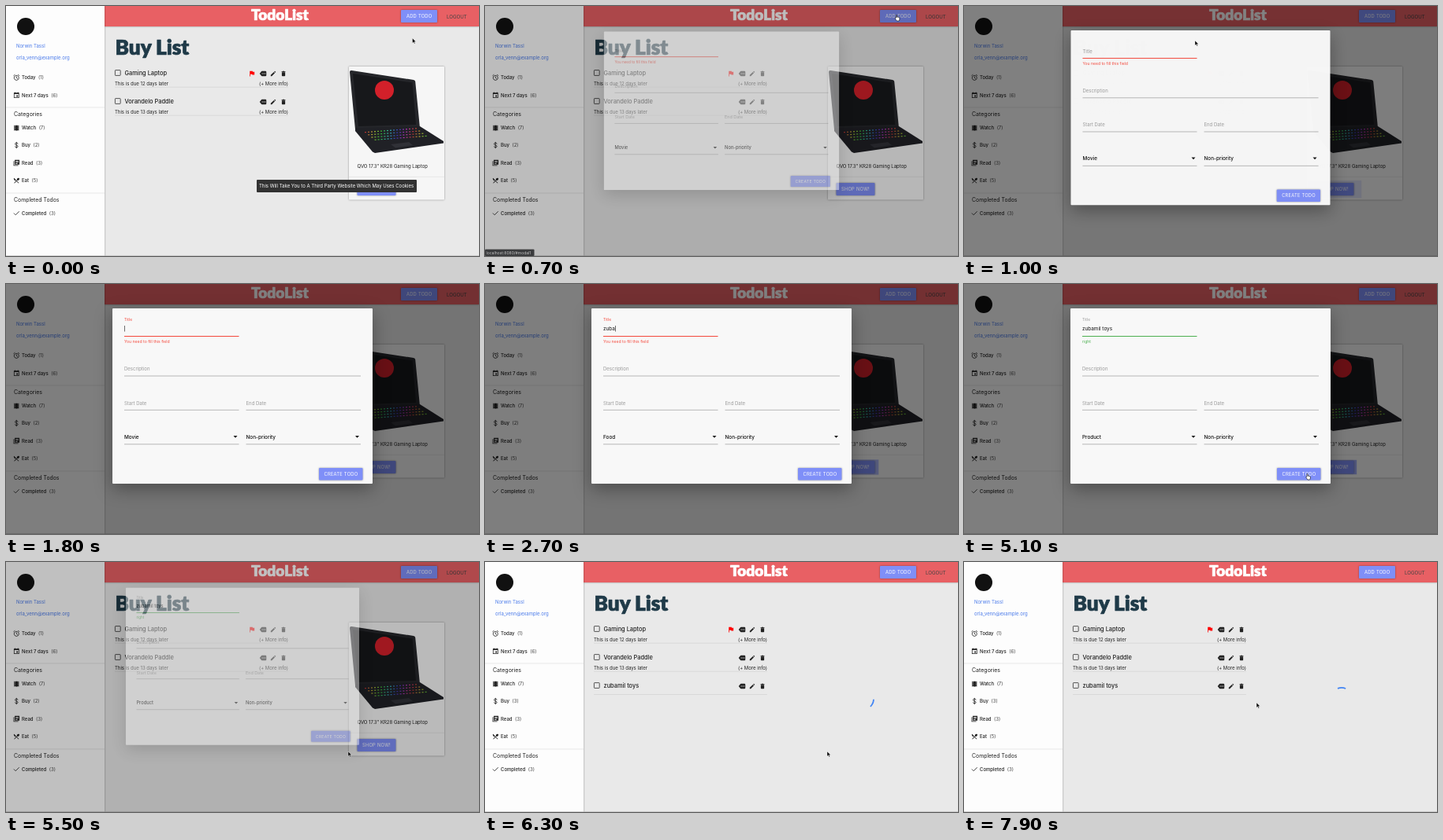
Write an HTML page that moves like this. It is 600 px wide and 318 px high and loops after 8 s.

```html
<!DOCTYPE html>
<html lang="en">
<head>
<meta charset="utf-8">
<title>TodoList</title>
<style>
html, body { margin: 0; width: 100%; height: 100%; overflow: hidden; background: #e9e9e9; }
svg { display: block; width: 100vw; height: 100vh; font: 6px Inter, sans-serif; fill: #222; }
.display { font-family: Lato, sans-serif; font-weight: 900; stroke-linejoin: round; stroke-width: .7; }
.medium { font-weight: 500; }
.button { font-size: 5.8px; letter-spacing: .22px; fill: #fff; }
.hint { fill: #9a9a9a; }
.input { font-size: 6.4px; fill: #111; }
.shadow { filter: drop-shadow(0 .8px 1px #0006); }
.deep-shadow { filter: drop-shadow(0 7px 11px #0005); }
</style>
</head>
<body>
<svg id="stage" viewBox="0 0 600 318" preserveAspectRatio="none"></svg>
<script>
const LOOP = 8000;
const OPEN = { start: 580, length: 560 };
const CLOSE = { start: 5410, length: 300 };
const FOCUS = 1250, TYPING = 2000, PER_KEY = 160, SUBMIT = 5000, REFRESH = 5700;
const NEW_ITEM = 'zubamil toys';
const RED = '#f4483c', GREEN = '#4caf50', BLUE = '#7f8ff8';

// Icons on a 24 unit grid; stroked ones are listed in LINE_ICONS.
const ICONS = {
  alarm: 'M12 5a8 8 0 1 0 .01 0zM12 8v5l4 3M2 6l5-4M17 2l5 4',
  event: 'M19 3h-1V1h-2v2H8V1H6v2H3v18h18V3zm0 16H5V8h14zm-2-7h-5v5h5z',
  film: 'M18 3v2h-2V3H8v2H6V3H4v18h2v-2h2v2h8v-2h2v2h2V3zM6 8h2v2H6zM6 13h2v2H6zM16 8h2v2h-2zM16 13h2v2h-2z',
  money: 'M17 8c0-5-10-5-10 0s10 3 10 8-10 5-10 0M12 1v22',
  book: 'M4 6H2v16h16v-2H4zM22 2H6v16h16zM19 11H9V9h10zM15 15H9v-2h6zM19 7H9V5h10z',
  food: 'M8.1 13.3l2.8-2.8-7-7c-1.5 1.6-1.5 4 0 5.7zM14.9 11.5c1.5.7 3.7.2 5.3-1.4 1.9-1.9 2.2-4.6.8-6.1-1.5-1.5-4.2-1.1-6.1.8-1.6 1.6-2.1 3.7-1.4 5.3L3.7 19.9l1.4 1.4 6.9-6.9 6.9 6.9 1.4-1.4-6.9-6.9z',
  check: 'M3 12l6 6L21 6',
  flag: 'M14.4 6L14 4H5v17h2v-7h5.6l.4 2h7V6z',
  tag: 'M21 3H8Q7 3 6 4L0 12l6 8q1 1 2 1h13q3 0 3-3V6q0-3-3-3zM8 10.5h3v3H8zM13 10.5h3v3h-3zM18 10.5h3v3h-3z',
  edit: 'M3 17.2V21h3.8L17.8 9.9l-3.7-3.7zM20.7 7a1 1 0 0 0 0-1.4l-2.3-2.3a1 1 0 0 0-1.4 0l-1.8 1.8 3.7 3.7z',
  trash: 'M6 19q0 2 2 2h8q2 0 2-2V7H6zM19 4h-3.5l-1-1h-5l-1 1H5v2h14z'
};
const LINE_ICONS = ['alarm', 'money', 'check'];

const text = (x, y, content, attrs = '') => `<text x="${x}" y="${y}" ${attrs}>${content}</text>`;
const rect = (x, y, w, h, fill, attrs = '') =>
  `<rect x="${x}" y="${y}" width="${w}" height="${h}" fill="${fill}" ${attrs}/>`;
const line = (x1, x2, y, color, attrs = '') =>
  `<path d="M${x1} ${y}H${x2}" stroke="${color}" stroke-width=".6" ${attrs}/>`;
const group = (id, content, attrs = '') => `<g id="${id}" ${attrs}>${content}</g>`;

function icon(name, cx, cy, size = 9, color = '#222') {
  const paint = LINE_ICONS.includes(name)
    ? `fill="none" stroke="${color}" stroke-width="2.2"` : `fill="${color}" fill-rule="evenodd"`;
  return `<path d="${ICONS[name]}" ${paint}
    transform="translate(${cx - size / 2} ${cy - size / 2}) scale(${size / 24})"/>`;
}

const button = (x, y, w, h, label, dx = 7) =>
  rect(x, y, w, h, BLUE, 'rx="1" class="shadow"') + text(x + dx, y + h / 2 + 2.1, label, 'class="button"');

function sidebar() {
  const entry = (name, cy, label, count, id = '') => icon(name, 13.3, cy) +
    text(20, cy + 2.2, `<tspan class="medium">${label}</tspan><tspan dx="3.5" fill="#444" id="${id}">(${count})</tspan>`);
  return rect(0, 0, 125, 318, '#fdfdfd', 'style="filter:drop-shadow(.5px 0 .8px #0006)"') +
    '<circle cx="25" cy="26" r="11" fill="#111"/>' +
    text(13, 52.7, 'Norwin Tassl', 'fill="#4b7bea"') +
    text(13, 67.7, 'orla_venn@example.org', 'fill="#4b7bea"') +
    entry('alarm', 91, 'Today', 1) + entry('event', 113.5, 'Next 7 days', 6) +
    line(0, 125, 129, '#d8d8d8') + text(10, 140.4, 'Categories', 'font-size="7"') +
    entry('film', 155, 'Watch', 7) + entry('money', 177, 'Buy', 2, 'buyCount') +
    entry('book', 199.5, 'Read', 3) + entry('food', 222, 'Eat', 5) +
    line(0, 125, 238, '#d8d8d8') + text(10, 248.9, 'Completed Todos', 'font-size="6.9"') +
    entry('check', 263.5, 'Completed', 3);
}

function todo(cy, title, days, flagged) {
  return rect(138.4, cy - 3.4, 6.8, 6.8, 'none', 'stroke="#444" stroke-width=".9" rx=".6"') +
    text(150.5, cy + 2.5, title, 'class="medium" font-size="7.4"') +
    (flagged ? icon('flag', 312, cy + 1, 9.5, '#f00') : '') +
    icon('tag', 326, cy + 1, 8.5) + icon('edit', 339, cy + 1, 8.5) + icon('trash', 352, cy + 1, 8.5) +
    (days ? text(138, cy + 15.8, `This is due ${days} days later`) + text(321, cy + 15.8, '(+ More info)') : '') +
    line(138, 358, cy + (days ? 18.2 : 11.5), '#cfcfcf');
}

function laptop() {
  let keys = '';
  for (let row = 0; row < 4; row++) {
    for (let col = 0; col < 17; col++) {
      const x = 455 + col * 4 + row * 4.2, y = 160 - col * .3 + row * 3.2;
      keys += rect(x.toFixed(1), y.toFixed(1), 2, 1.2, `hsl(${(col * 23 + row * 31) % 360} 55% 45%)`);
    }
  }
  return '<path d="M436 84Q436 81.500 438.500 82L517 94Q519 94.500 519.200 96L525 155 443 157z" fill="#25262a"/>' +
    '<path d="M440 86L515.500 97.500 520 151 447 153z" fill="#17181b"/>' +
    '<circle cx="480" cy="107" r="12" fill="#d3202a"/>' +
    '<path d="M443 155L525 153 555 172V174.500L468 187 465 185.500 443 159z" fill="#202126"/>' +
    '<path d="M488 176L511 173 516 177 494 180.500z" fill="#303137"/>' + keys;
}

const card = () => rect(435, 77, 121, 169.5, '#f6f6f6', 'rx="1" class="shadow"') + laptop() +
  text(445.5, 205.8, 'QVO 17.3" KR28 Gaming Laptop') + line(435, 556, 217.3, '#dcdcdc') +
  rect(445.5, 225, 49, 16, BLUE, 'id="pulse"') + button(445.5, 225, 49, 16, 'SHOP NOW!', 6.5);

function modal() {
  const field = (x1, x2, y, label) => text(x1, y, label, 'class="hint"') + line(x1, x2, y + 6.8, '#8c8c8c');
  const select = (x, id, value) => text(x, 196.5, value, `id="${id}" class="input medium"`) +
    line(x, x + 145.5, 203.8, '#8c8c8c') + `<path d="M${x + 138.5} 193h5l-2.5 2.7z" fill="#111"/>`;
  return rect(135, 31, 330, 223, '#f8f8f8', 'rx="1" class="deep-shadow"') +
    text(150, 59.7, 'Title', 'id="titleLabel"') + text(150, 59, '', 'id="titleValue" class="input"') +
    rect(150, 53, .6, 7.5, '#111', 'id="caret"') + rect(150, 66, 145.5, 1, RED, 'id="titleLine"') +
    text(150, 75.3, '', 'id="titleHelp" font-size="5.1"') +
    field(150, 450, 110.2, 'Description') + field(150, 295.5, 153.5, 'Start Date') +
    field(304.5, 450, 153.5, 'End Date') +
    select(150, 'category', 'Movie') + select(304.5, 'priority', 'Non-priority') +
    button(397, 234, 55.5, 15.5, 'CREATE TODO', 6.5);
}

document.getElementById('stage').innerHTML =
  rect(0, 0, 600, 318, '#e9e9e9') +
  rect(125, 0, 475, 26, '#e86064', 'class="shadow"') +
  text(311, 17.8, 'TodoList', 'class="display" font-size="19" fill="#fff" stroke="#fff"') +
  button(501, 5, 46, 16, 'ADD TODO') + text(559, 15.6, 'LOGOUT', 'font-size="6.1" fill="#444"') +
  text(138.5, 62.2, 'Buy List', 'class="display" font-size="26.1" fill="#1f3a48" stroke="#1f3a48"') +
  todo(85, 'Gaming Laptop', 12, true) + todo(121, 'Vorandelo Paddle', 13) +
  group('newTodo', todo(157, NEW_ITEM)) +
  group('card', card()) +
  '<path id="spinner" fill="none" stroke="#4285f4" stroke-width="1.8"/>' +
  sidebar() + line(0, 600, 317.7, '#aaa') +
  rect(0, 0, 600, 318, '#000', 'id="overlay"') + group('modal', modal()) +
  group('tooltip', rect(318, 221, 203, 16, '#323232', 'rx="1"') +
    text(321, 231.2, 'This Will Take You to A Third Party Website Which May Uses Cookies', 'fill="#fff"')) +
  group('status', rect(0, 309.5, 62.5, 8.5, '#3a3b3d', 'rx="1"') +
    text(1.5, 315.6, 'localhost:8080/#modal1', 'font-size="5" fill="#c4c4c4"')) +
  group('cursor',
    '<path id="arrow" d="M0 0v6.2l1.5-1.4 1 2.3 1-.4-1-2.3h2z" fill="#000" stroke="#fff" stroke-width=".4"/>' +
    '<path id="hand" d="M1 4V.7q.6-.9 1.2 0v2.5q2-.4 3.2.9v2q-.4 1.5-1 1.9H2Q.6 6.6-.2 4.8.1 3.8 1 4z" fill="#fff" stroke="#000" stroke-width=".6"/>');

const parts = {};
document.querySelectorAll('[id]').forEach(el => { parts[el.id] = el; });

const clamp = v => Math.min(1, Math.max(0, v));
const ramp = (t, { start, length }) => clamp((t - start) / length);
const mix = (a, b, k) => a + (b - a) * k;
const set = (id, attrs) => Object.entries(attrs).forEach(([k, v]) => parts[id].setAttribute(k, v));
const show = (id, visible) => set(id, { display: visible ? 'inline' : 'none' });

// Pointer stops: time, x, y
const POINTER = [
  [0, 515.5, 41], [100, 515.5, 41], [200, 520, 12], [720, 520.5, 11], [1000, 293, 44],
  [1250, 215, 56], [3700, 215, 56], [4000, 433.5, 244], [5000, 433.5, 244], [5100, 434, 241],
  [6750, 434, 241], [7300, 372, 180], [LOOP, 371, 179]
];

function drawPointer(t) {
  const i = POINTER.findIndex(stop => stop[0] > t);
  const [t0, x0, y0] = POINTER[i - 1], [t1, x1, y1] = POINTER[i];
  let k = (t - t0) / (t1 - t0);
  k = k * k * (3 - 2 * k);
  set('cursor', { transform: `translate(${mix(x0, x1, k)} ${mix(y0, y1, k)})` });
  const hand = (t >= 200 && t < 780) || (t >= 3950 && t < 5200);
  show('hand', hand);
  show('arrow', !hand);
  show('cursor', t < 1300 || t >= 3700);
}

function drawForm(t) {
  const valid = t >= SUBMIT, focused = t >= FOCUS && !valid;
  const typed = NEW_ITEM.slice(0, Math.max(0, Math.floor((t - TYPING) / PER_KEY)));
  const lift = ramp(t, { start: FOCUS, length: 150 });
  set('titleLabel', { y: mix(59.7, 47.2, lift), 'font-size': mix(6, 4.9, lift), fill: focused ? RED : '#9a9a9a' });
  parts.titleValue.textContent = typed;
  show('caret', focused);
  set('caret', { x: 150.3 + parts.titleValue.getComputedTextLength() });
  set('titleLine', { fill: valid ? GREEN : RED });
  set('titleHelp', { fill: valid ? GREEN : RED });
  parts.titleHelp.textContent = valid ? 'right' : 'You need to fill this field';
  parts.category.textContent = t < 2600 ? 'Movie' : t < 3400 ? 'Food' : 'Product';
}

function drawModal(t) {
  const opened = 1 - (1 - ramp(t, OPEN)) ** 3;
  const open = t < CLOSE.start ? opened : (1 - ramp(t, CLOSE)) ** 2;
  const scale = mix(.8, 1, open);
  show('modal', open > 0);
  set('overlay', { opacity: open / 2 });
  set('modal', {
    opacity: open ** 1.15,
    transform: `translate(300 ${142.5 - 19 * (1 - open)}) scale(${scale}) translate(-300 -142.5)`
  });
  // The shop button sends out a fading halo during the first half of each beat.
  const beat = (t + 1060) / 607 % 1 * 2;
  const grow = 1 + clamp(beat) / 2;
  show('pulse', open > 0 && beat < 1);
  set('pulse', { opacity: 1 - clamp(beat), transform: `translate(470 233) scale(${grow}) translate(-470 -233)` });
}

function drawSpinner(t) {
  const turn = (t - 7900) / 950;
  const middle = Math.PI * (2 * turn - .5);
  const half = .37 + 2 * Math.sin(Math.PI * (t - 7900) / 800) ** 2;
  const point = a => `${479 + 14 * Math.cos(a)} ${174 + 14 * Math.sin(a)}`;
  set('spinner', { d: `M${point(middle - half)}A14 14 0 ${half > Math.PI / 2 ? 1 : 0} 1 ${point(middle + half)}` });
}

function draw(t) {
  const refreshed = t >= REFRESH;
  show('card', !refreshed);
  show('spinner', refreshed);
  show('newTodo', refreshed);
  parts.buyCount.textContent = refreshed ? '(3)' : '(2)';
  set('tooltip', { opacity: 1 - ramp(t, { start: 50, length: 150 }) });
  show('status', t >= 450 && t < 850);
  drawForm(t);
  drawModal(t);
  drawSpinner(t);
  drawPointer(t);
}

function tick() {
  draw(performance.now() % LOOP);
  requestAnimationFrame(tick);
}
tick();
</script>
</body>
</html>
```
